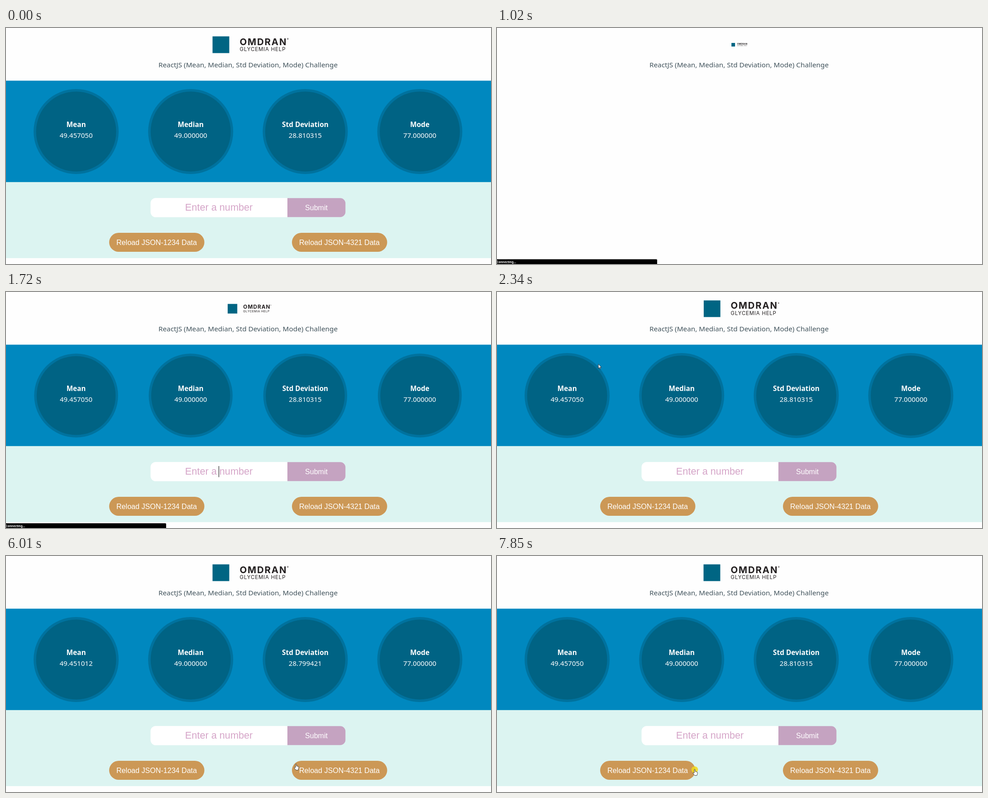
An HTML page that plays this animation: 1072 px wide and 522 px high, repeating every 8 s.

```html
<!DOCTYPE html>
<html lang="en">
<head>
<meta charset="utf-8">
<title>ReactJS Challenge</title>
<style>
html, body { margin: 0; width: 100%; height: 100%; overflow: hidden; background: #fefefe; }
svg { display: block; width: 1072px; height: 522px; }
text { font-family: "Noto Sans", "Open Sans", sans-serif; text-anchor: middle; fill: #fff; }
.form text { font: 16.1px "Liberation Sans", sans-serif; }
.form #field { font-size: 21.7px; }
.brand text { font-family: Inter, sans-serif; text-anchor: start; fill: #231f20; }
.name { font-size: 15.4px; font-weight: 700; }
.value { font-size: 15.1px; }
</style>
</head>
<body>
<svg viewBox="0 0 1072 522">
  <g id="brand" class="brand">
    <rect x="456.5" y="18.5" width="37" height="37" fill="#006583"/>
    <text x="516.5" y="37.5" font-size="20.5" font-weight="700" letter-spacing="1.8">OMDRAN</text>
    <text x="516.5" y="51" font-size="11.5" letter-spacing=".8">GLYCEMIA HELP</text>
    <text x="621" y="27" font-size="5.5">®</text>
  </g>
  <text x="535" y="86.7" font-size="15.3" style="fill:#41535c">ReactJS (Mean, Median, Std Deviation, Mode) Challenge</text>

  <g id="page">
    <rect y="340" width="1072" height="169" fill="#dcf4f1"/>
    <rect y="116.5" width="1072" height="224.3" fill="#0088bf"/>
    <g id="stats"></g>
    <g class="form">
      <path d="M622 376H331a11.5 11.5 0 0 0-11.5 11.5V407a11.5 11.5 0 0 0 11.5 11.5H622Z" fill="#fff"/>
      <path id="submit" d="M622 376.3H738.8a11.5 11.5 0 0 1 11.5 11.5V406.7a11.5 11.5 0 0 1-11.5 11.5H622Z"/>
      <text x="686" y="402.7">Submit</text>
      <text id="field" x="470.6" y="404.3"></text>
      <rect id="caret" y="385" width="1" height="24.5"/>
      <rect x="228" y="453" width="210.5" height="42" rx="21" fill="#cc9856"/>
      <text x="333" y="479.5">Reload JSON-1234 Data</text>
      <rect x="632" y="453" width="210.5" height="42" rx="21" fill="#cc9856"/>
      <text x="737" y="479.5">Reload JSON-4321 Data</text>
    </g>
  </g>

  <g id="status">
    <path d="M0 511.5H352q2 0 2 2V522H0Z"/>
    <text x="-1" y="519.6" font-size="6.6" font-weight="600" style="text-anchor:start">Connecting...</text>
  </g>

  <g id="mouse">
    <circle id="click" cy="1" r="7.3" fill="#f0d91c" opacity=".85"/>
    <path id="arrow" d="M0 0V9.4L2.1 7.4L3.6 10.8L5.1 10.1L3.6 6.9H6.6Z" fill="#fff" stroke="#222" stroke-width=".8"/>
    <path id="hand" transform="translate(-4)" d="M3 8.5V1.4a1 1 0 0 1 2 0V5l4 1q1 .3 1 1.5V10l-1.1 4H3.8L.6 9.6Q0 7.8 1.4 7.8Z" fill="#fff" stroke="#222" stroke-width=".8"/>
  </g>
</svg>
<script>
const LOOP = 8000, BLINK = 520;
// Moments of the story, in ms.
const refresh = 640, blank = 1020, loaded = 1390, idle = 2100,
  firstKey = 3780, secondKey = 3940, submit = 5130,
  hover = 6010, reload = 6090, reloaded = 6410, refocus = 6560, lastClick = 7780;

const $ = id => document.getElementById(id);
const clamp = v => Math.min(1, Math.max(0, v));
const progress = (t, from, length) => clamp((t - from) / length);
const easeOut = k => 1 - (1 - k) ** 2;
const easeInOut = k => k < .5 ? 2 * k * k : 1 - 2 * (1 - k) ** 2;
const mix = (a, b, k) => a + (b - a) * k;
const between = (t, a, b) => t >= a && t < b;
const show = (id, on) => $(id).setAttribute('visibility', on ? 'inherit' : 'hidden');

// Name, reading, and the reading once the typed number is added.
const stats = [['Mean', '49.457050', '49.451012'], ['Median', '49.000000'],
  ['Std Deviation', '28.810315', '28.799421'], ['Mode', '77.000000']];
$('stats').innerHTML = stats.map(([name]) => `<g>
  <circle r="94" fill="#00729e"/><circle r="88.5" fill="#006384"/>
  <text class="name" y="-10">${name}</text><text class="value"></text></g>`).join('');
const discs = [...$('stats').children];

function drawStats(t) {
  const shown = t >= reloaded ? reloaded : t >= blank ? loaded : -LOOP;
  const size = mix(.71, 1, easeOut(progress(t, shown - 60, 500)));
  discs.forEach((disc, i) => {
    const added = between(t, submit, reloaded) && stats[i][2];
    const fade = easeInOut(progress(t, (added ? submit : shown) - 60, 300));
    const value = disc.lastElementChild;
    disc.setAttribute('transform', `translate(${155 + 253.2 * i} 229) scale(${size})`);
    value.textContent = added || stats[i][1];
    value.setAttribute('y', mix(5, 14, fade));
    value.setAttribute('opacity', fade);
  });
}

function drawForm(t) {
  const typed = !between(t, firstKey, submit) ? '' : t < secondKey ? '4' : '42';
  $('field').textContent = typed || 'Enter a number';
  $('field').style.fill = typed ? '#000' : '#d5a5c8';
  $('submit').setAttribute('fill', typed ? '#a22a76' : '#c5a3c1');

  // The blink restarts whenever the field gains focus or its text changes.
  const focus = [480, loaded, secondKey, submit, refocus].filter(f => f <= t).pop();
  const focused = t < blank || between(t, loaded, hover) || between(t, refocus, lastClick);
  $('caret').setAttribute('x', 470 + 6 * typed.length);
  show('caret', focused && Math.floor((t - focus) / BLINK) % 2 === 0);
}

// Pointer moves: start, length, and where each one ends.
const moves = [[2112, 228, 223.5, 159], [2340, 240, 296, 222], [2760, 310, 455.5, 345],
  [hover, 1, 641, 459.5], [7020, 580, 437, 471.5]];

function drawPointer(t) {
  let x = 150, y = 16;
  for (const [from, length, toX, toY] of moves) {
    const k = progress(t, from - 1, length);
    x = mix(x, toX, k);
    y = mix(y, toY, k);
  }
  const seen = t >= moves[0][0];
  const onButton = y > 453 && (x < 439 || x > 632);
  $('mouse').setAttribute('transform', `translate(${x} ${y})`);
  show('arrow', seen && !onButton);
  show('hand', onButton);
  show('click', between(t, reload, reloaded) || t >= lastClick);
}

function draw(t) {
  const grow = t < blank ? 1 : mix(.214, 1, easeInOut(progress(t, blank + 60, 1340)));
  $('brand').setAttribute('transform', `translate(535 37) scale(${grow}) translate(-535 -37)`);
  show('page', !between(t, blank, loaded));
  show('status', between(t, refresh, idle));
  drawStats(t);
  drawForm(t);
  drawPointer(t);
}

const start = performance.now();
function frame() {
  draw((performance.now() - start) % LOOP);
  requestAnimationFrame(frame);
}
frame();
</script>
</body>
</html>
```
